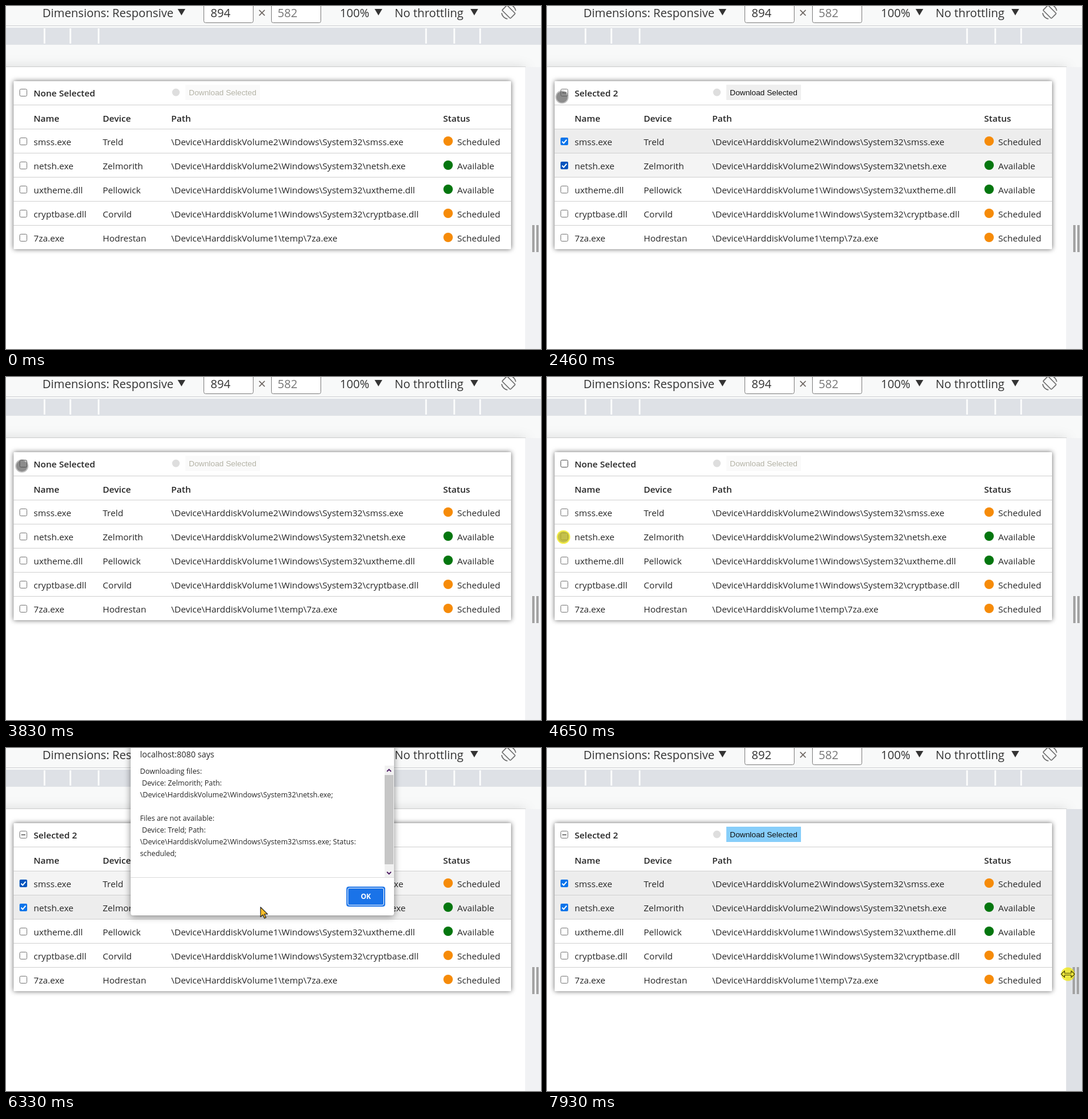
An HTML page for the animation above (8000 ms loop, 910 by 584 pixels).

```html
<!DOCTYPE html>
<html lang="en">
<head>
<meta charset="utf-8">
<title>File table</title>
<style>
  html, body { margin: 0; width: 100%; height: 100%; overflow: hidden; background: #fff; }
  svg { display: block; width: 910px; height: 584px; }
  text { font-family: "Open Sans", "Noto Sans", sans-serif; white-space: pre; }
  .arial { font-family: "Liberation Sans", Arial, sans-serif; }
  .page { filter: drop-shadow(0 0 10px #0002); }
  .card { filter: drop-shadow(0 0 4px #0009); }
  .dialog { filter: drop-shadow(0 2px 6px #0007); }
</style>
</head>
<body>
<svg viewBox="0 0 910 584">
  <g id="base"></g>
  <g id="live"></g>
</svg>
<script>
const LOOP = 8000, PRESS = 130, ROW = 41;
const ENTER = 70, OPEN = 5900, REPAINT = 6600, CLOSE = 7220, GRAB = 7600, DRAG = 7870;
const INK = '#262626', LINE = '#d0d0d0', BLUE = '#1a73e8';

const files = [
  ['smss.exe', 'Treld', 'HarddiskVolume2\\Windows\\System32', false],
  ['netsh.exe', 'Zelmorith', 'HarddiskVolume2\\Windows\\System32', true],
  ['uxtheme.dll', 'Pellowick', 'HarddiskVolume1\\Windows\\System32', true],
  ['cryptbase.dll', 'Corvild', 'HarddiskVolume1\\Windows\\System32', false],
  ['7za.exe', 'Hodrestan', 'HarddiskVolume1\\temp', false],
].map(([name, device, dir, ready]) => ({ name, device, ready, path: `\\Device\\${dir}\\${name}` }));

// Places the pointer visits
const box = i => [28, 231.5 + ROW * i];
const head = [27, 151.5], button = [355, 150], ok = [612, 254], grip = [886, 385];
const entry = [679, 536];

// Pointer moves: arrival time, travel time, place
const moves = [
  [720, 650, [12, 215]], [820, 100, box(0)], [1330, 200, box(1)],
  [1950, 480, [228, 328]], [2460, 510, [25.5, 155]], [2560, 80, head],
  [3070, 340, [14, 310]], [3520, 320, head],
  [4100, 270, [36, 301]], [4380, 280, box(1)], [4900, 190, box(0)],
  [5380, 300, [302.5, 178.5]], [5580, 200, button],
  [6330, 380, [433, 271]], [7000, 580, ok], [7660, 440, grip],
];

// Clicks: release time and what on the page is hit, if anything
const clicks = [
  [1080, 0], [1450, 1], [2700, 'all'], [3680, 'all'], [4690, 1], [5050, 0],
  [5780, 'button'], [7200], [7920],
];

const ease = k => k * k * (3 - 2 * k);
const clamp = k => Math.min(1, Math.max(0, k));

function pointerAt(t) {
  let [x, y] = entry;
  for (const [end, span, [px, py]] of moves) {
    const k = ease(clamp((t - end + span) / span));
    x += (px - x) * k;
    y += (py - y) * k;
  }
  return [x, y];
}

// Replays the clicks up to time t; the open dialog delays the button's hover style.
function stateAt(t) {
  let chosen = new Set(), hot;
  for (const [time, hit] of clicks) {
    if (time > t || hit === undefined) continue;
    if (hit === 'all') chosen = new Set(chosen.size < files.length ? files.keys() : []);
    else if (hit !== 'button' && !chosen.delete(hit)) chosen.add(hit);
    if (hit !== 'button' || t > REPAINT) hot = hit;
  }
  return { chosen, hot };
}

const isDown = t => t > GRAB + 180 || clicks.some(([time]) => t >= time - PRESS && t < time);

const rect = (x, y, w, h, fill, more = '') =>
  `<rect x="${x}" y="${y}" width="${w}" height="${h}" fill="${fill}" ${more}/>`;
const circle = (x, y, r, fill, opacity = 1) =>
  `<circle cx="${x}" cy="${y}" r="${r}" fill="${fill}" opacity="${opacity}"/>`;
const path = (d, stroke, width, fill = 'none', more = '') =>
  `<path d="${d}" stroke="${stroke}" stroke-width="${width}" fill="${fill}" ${more}/>`;
const text = (x, y, s, size = 15.1, fill = INK, more = '') =>
  `<text x="${x}" y="${y}" font-size="${size}" fill="${fill}" ${more}>${s}</text>`;
const bold = (x, y, s) => text(x, y, s, 15.1, INK, 'font-weight="600"');
const label = (x, s, fill = '#333') => text(x, 19, s, 19.7, fill);

function page() {
  return rect(0, 0, 910, 584, '#f8f9f9') + rect(0, 103, 884, 1, '#dcdddd') +
    rect(-20, 104, 903, 520, '#fff', 'class="page"') +
    rect(13, 128, 846, 286, '#fff', 'class="card" rx="1"') + circle(289, 147, 6.5, '#dedede');
}

function toolbar() {
  const triangle = x => path(`M${x} 5h13l-6.5 11z`, 'none', 0, '#333');
  const field = x => rect(x + .5, -8.5, 84, 37, '#fff', 'rx="3" stroke="#7d7d7d"');
  const tick = x => rect(x, 38, 3, 26, '#fafbfb');
  return rect(0, 33, 910, 1, '#cfd1d3') + rect(0, 37, 910, 29, '#dee1e6') +
    [64, 108, 156].map(x => tick(x) + tick(869 - x)).join('') +
    label(62, 'Dimensions: Responsive') + triangle(292) + field(336) + field(451) +
    text(428.5, 20, '×', 24, '#6b6460') + label(462, '582', '#777') +
    label(568, '100%') + triangle(627) + label(661, 'No throttling') + triangle(790) +
    rect(845, 4, 20, 12, 'none', 'rx="1.5" stroke="#6e6e6e" stroke-width="1.7" transform="rotate(45 855 10)"') +
    path('M857 -2a12 12 0 0 1 10 10M853 22a12 12 0 0 1-10-10', '#6e6e6e', 1.7);
}

function checkbox(y, mark, hot) {
  if (mark === 'on')
    return rect(23, y - 6.5, 13, 13, hot ? '#0455bd' : '#0b74ea', 'rx="2"') +
      path(`M25.7 ${y + .3}l2.7 2.8 5-6`, '#fff', 2);
  return rect(23.5, y - 6, 12, 12, '#fff', `rx="2" stroke="${hot ? '#4f4f4f' : '#767676'}"`) +
    (mark === 'some' ? rect(26, y - .5, 7, 1.5, '#555') : '');
}

function fileRow(f, i, on, hot) {
  const y = 210 + ROW * i, base = y + 27;
  return (on ? rect(13, y, 846, ROW - 1, hot ? '#f4f4f4' : '#ededed') : '') +
    rect(13, y - 1, 846, 1, LINE) + checkbox(y + 20.5, on ? 'on' : '', hot) +
    text(47, base, f.name) + text(164.5, base, f.device) + text(281, base, f.path) +
    circle(752, y + 20, 8, f.ready ? '#04760f' : '#f68b09') +
    text(767.5, base, f.ready ? 'Available' : 'Scheduled');
}

function table({ chosen, hot }) {
  const n = chosen.size, mark = n === files.length ? 'on' : n ? 'some' : '';
  const fill = hot === 'button' ? '#87cefa' : n ? '#efefef' : '#fafafa';
  return checkbox(147.5, mark, hot === 'all') +
    bold(47, 154, n ? `Selected ${n}` : 'None Selected') +
    rect(305, 134, 127, 26, fill) + rect(13, 168, 846, 1, LINE) +
    text(311, 152, 'Download Selected', 13.333, n ? '#111' : '#b4b3a6', 'class="arial"') +
    bold(47, 197, 'Name') + bold(164.5, 197, 'Device') + bold(281, 197, 'Path') + bold(743.5, 197, 'Status') +
    files.map((f, i) => fileRow(f, i, chosen.has(i), hot === i)).join('');
}

function dialog() {
  const [late, ready] = files;
  const lines = [
    'Downloading files:', ` Device: ${ready.device}; Path:`, `${ready.path};`, '',
    'Files are not available:', ` Device: ${late.device}; Path:`, `${late.path}; Status:`, 'scheduled;',
  ];
  return rect(212, -10, 448, 295, '#fff', 'class="dialog" rx="4"') +
    text(228, 16, 'localhost:8080 says', 14) +
    lines.map((l, i) => text(228, 44 + 20 * i, l, 12.3)).join('') +
    rect(644, 30, 16, 190, '#f1f1f1') + rect(644, 46, 15, 152, '#c6c6c6') +
    path('M648 40l3.5-3.5 3.5 3.5M648 211l3.5 3.5 3.5-3.5', '#4d1b63', 1.8) +
    rect(212, 220, 448, 1, '#dcdcdc') +
    rect(579, 236, 66, 34, BLUE, 'rx="4"') +
    rect(581.5, 238.5, 61, 29, BLUE, 'rx="2.5" stroke="#fff"') +
    text(612, 257, 'OK', 11.8, '#fff', 'font-weight="700" text-anchor="middle"');
}

function pointer(t, inDialog) {
  if (t < ENTER) return '';
  const [x, y] = pointerAt(t), down = isDown(t);
  const glow = down ? circle(x, y, 11.5, '#f0e800', .72) : '';
  const place = `transform="translate(${x} ${y})" stroke-linejoin="round"`;
  if (inDialog)
    return glow + path('M0 0v16.5l4-3.6 2.6 6 2.7-1.2-2.6-5.8h5.3z', '#222', 1.2, '#fbc02a', place);
  if (t >= GRAB)
    return glow + path('M-11.5 0l6-5.5v4h11v-4l6 5.5-6 5.5v-4h-11v4z', '#4a4608', 1.2, '#f5ed3c', place);
  return (glow || circle(x, y, 11.3, '#666', .4)) + circle(x, y, 9.5, '#555', down ? .3 : .5);
}

function scene(t) {
  const dragged = t >= DRAG, gripX = dragged ? 894 : 895, inDialog = t >= OPEN && t < CLOSE;
  const bar = x => rect(x, 373, 4, 46, '#a3a3a3');
  return label(348, dragged ? '892' : '894') +
    rect(883, 104, 27, 480, t >= GRAB ? '#dee1e6' : '#f1f2f4') + bar(gripX) + bar(gripX + 7) +
    table(stateAt(t)) + (inDialog ? dialog() : '') + pointer(t, inDialog);
}

const live = document.getElementById('live');
document.getElementById('base').innerHTML = page() + toolbar();

const start = performance.now();
function frame() {
  live.innerHTML = scene((performance.now() - start) % LOOP);
  requestAnimationFrame(frame);
}
frame();
</script>
</body>
</html>
```
